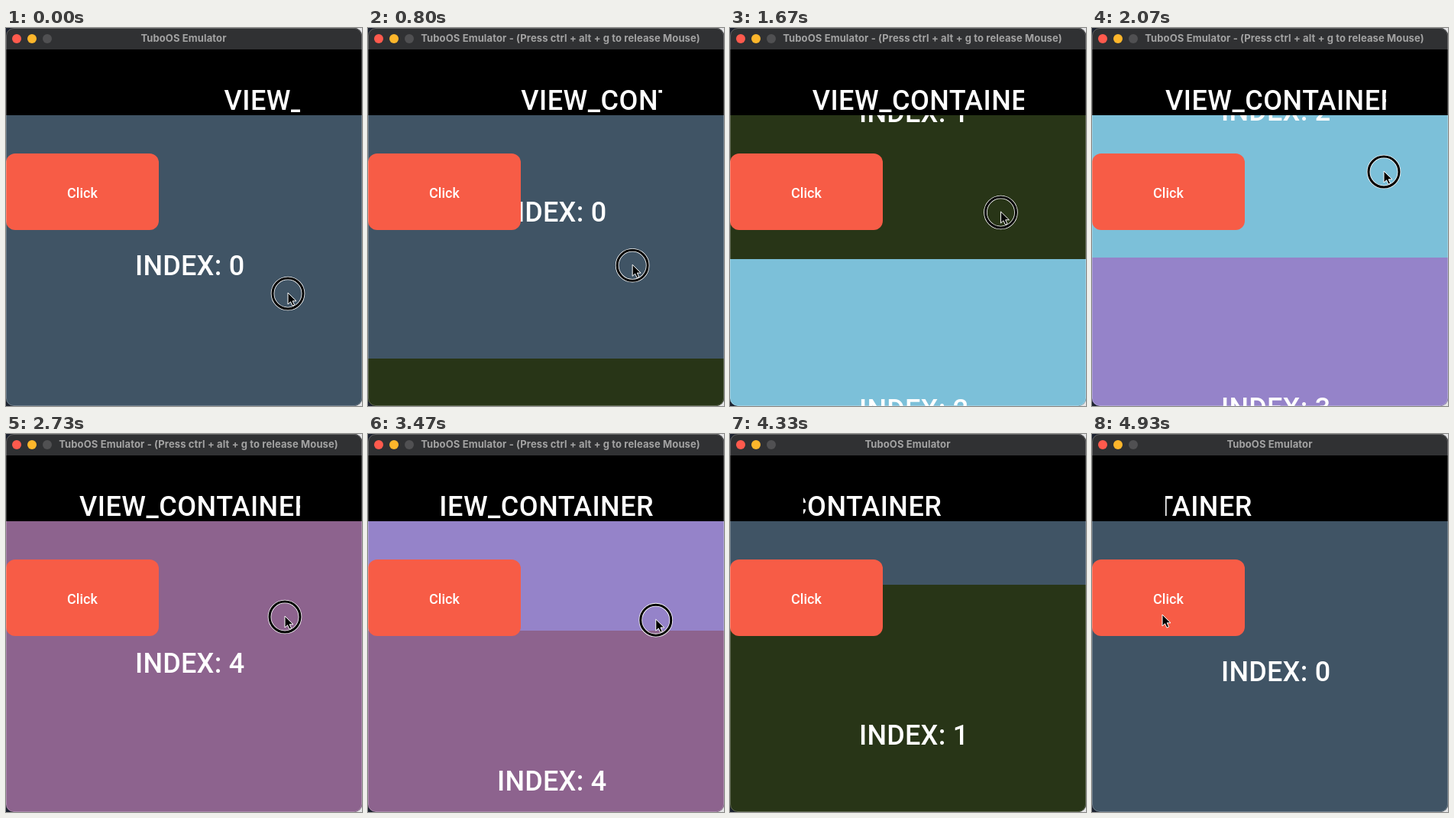
An HTML page for the animation above (4990 ms loop, 466 by 494 pixels).

```html
<!DOCTYPE html>
<html lang="en">
<head>
<meta charset="utf-8">
<title>Emulator</title>
<style>
  html, body { margin: 0; width: 100%; height: 100%; overflow: hidden; }
  body { background: linear-gradient(90deg, #1c2230 50%, #e4e4e6 50%); }
  svg { display: block; }
  text { font-family: Roboto, sans-serif; font-weight: 500; fill: #fff; }
  .title { font: 700 13px Inter, sans-serif; letter-spacing: .12px; fill: #a3a3a3; text-anchor: middle; }
  .big { font-size: 36px; }
  .label { letter-spacing: .25px; }
  .marquee { letter-spacing: .5px; }
  .button { font-size: 18px; text-anchor: middle; }
</style>
</head>
<body>
<svg width="466" height="494" viewBox="0 0 466 494">
  <defs>
    <clipPath id="window"><rect width="466" height="494" rx="10"/></clipPath>
    <clipPath id="view"><rect y="114" width="466" height="380"/></clipPath>
    <clipPath id="heading"><rect x="96" y="70" width="289" height="50"/></clipPath>
  </defs>
  <g clip-path="url(#window)">
    <rect width="466" height="494"/>
    <rect width="466" height="28" fill="#303133"/>
    <circle cx="14" cy="14" r="6" fill="#ff5a4d"/>
    <circle cx="34" cy="14" r="6" fill="#fdb62b"/>
    <circle cx="54" cy="14" r="6" fill="#505052"/>
    <text id="title" class="title" y="18"></text>
    <g clip-path="url(#view)"><g id="pages"></g></g>
    <g clip-path="url(#heading)"><text id="marquee" class="big marquee" y="107">VIEW_CONTAINER</text></g>
    <rect y="164" width="200" height="100" rx="12" fill="#f75c46"/>
    <text class="button" x="100" y="222">Click</text>
    <g id="cursor">
      <g id="ring" fill="none">
        <circle cy="1" r="20" stroke="#fff" stroke-width="4.6"/>
        <circle cy="1" r="20" stroke="#000" stroke-width="3"/>
      </g>
      <path d="M0 0V15L3.5 11.8 6 17.2 8.6 16 6.2 10.8H11Z" stroke="#fff"/>
    </g>
  </g>
  <rect x=".5" y=".5" width="465" height="493" rx="9.5" fill="none" stroke="#fff" stroke-opacity=".25"/>
</svg>
<script>
const LOOP = 4990, STEP = 200 / 3;
const PAGE = 388, TOP = 114, FIRST_PULL = 257, END = 1563;
const COLORS = ['#405465', '#283517', '#7cc0d9', '#9583c9', '#8d638e'];

const $ = id => document.getElementById(id);
const ramp = (t, from, to) => Math.min(1, Math.max(0, (t - from) / (to - from)));
const smooth = p => p * p * (3 - 2 * p);
const easeOut = p => p * (2 - p);
const mix = (a, b, p) => a + (b - a) * p;

// A slow first pull, a steady run to the last page, then one swing back.
function scrollAt(t) {
  return FIRST_PULL * ramp(t, 600, 1330)
    + (END - FIRST_PULL) * ramp(t, 1330, 2670)
    - END * smooth(ramp(t, 3150, 4796));
}

// The heading slides in, rests at the left edge, then slides out.
function marqueeAt(t) {
  const rest = 96;
  return Math.max(rest, 285.5 - 0.1065 * t) - 0.1125 * Math.max(0, t - 3235);
}

// Key positions of the pointer: time, x, y.
const POINTER = [[0, 369, 346], [1330, 331, 285], [2070, 382, 187], [2730, 365, 238], [3800, 382, 244]];

function pointerAt(t) {
  if (t >= 4670) {
    const p = easeOut(ramp(t, 4670, 4930));
    return [mix(128, 92, p), mix(400, 236, p)];
  }
  const i = Math.max(1, POINTER.findIndex(key => key[0] > t));
  const last = t >= POINTER[POINTER.length - 1][0];
  const [a, b] = last ? POINTER.slice(-2) : [POINTER[i - 1], POINTER[i]];
  const p = ramp(t, a[0], b[0]);
  return [mix(a[1], b[1], p), mix(a[2], b[2], p)];
}

// The last page runs on to the bottom of the view.
$('pages').innerHTML = COLORS.map((color, i) => `
  <rect y="${i * PAGE}" width="466" height="${PAGE + 20}" fill="${color}"/>
  <text class="big label" x="169" y="${i * PAGE + 209}">INDEX: ${i}</text>`).join('');

function setTitle(grabbed) {
  const text = 'TuboOS Emulator' + (grabbed ? ' - (Press ctrl + alt + g to release Mouse)' : '');
  if ($('title').textContent === text) return;
  $('title').textContent = text;
  $('title').setAttribute('x', grabbed ? 252 : 232.5);
}

const show = (id, visible) => { $(id).style.display = visible ? '' : 'none'; };

function draw(t) {
  $('pages').setAttribute('transform', `translate(0 ${Math.round(TOP - scrollAt(t))})`);
  $('marquee').setAttribute('x', marqueeAt(t));
  $('cursor').setAttribute('transform', `translate(${pointerAt(t)})`);
  setTitle(t >= 70 && t < 4200);
  show('cursor', t < 4200 || t >= 4670);
  show('ring', t < 3730);
}

// Motion advances about fifteen times a second, on a 10 ms grid.
function stepTime(t) {
  const time = k => Math.round(k * STEP / 10) * 10;
  let k = Math.floor(t / STEP) + 1;
  while (k > 0 && (time(k) > t || time(k) >= LOOP)) k--;
  return time(k);
}

const start = performance.now();
function tick() {
  draw(stepTime((performance.now() - start) % LOOP));
  requestAnimationFrame(tick);
}
tick();
</script>
</body>
</html>
```
